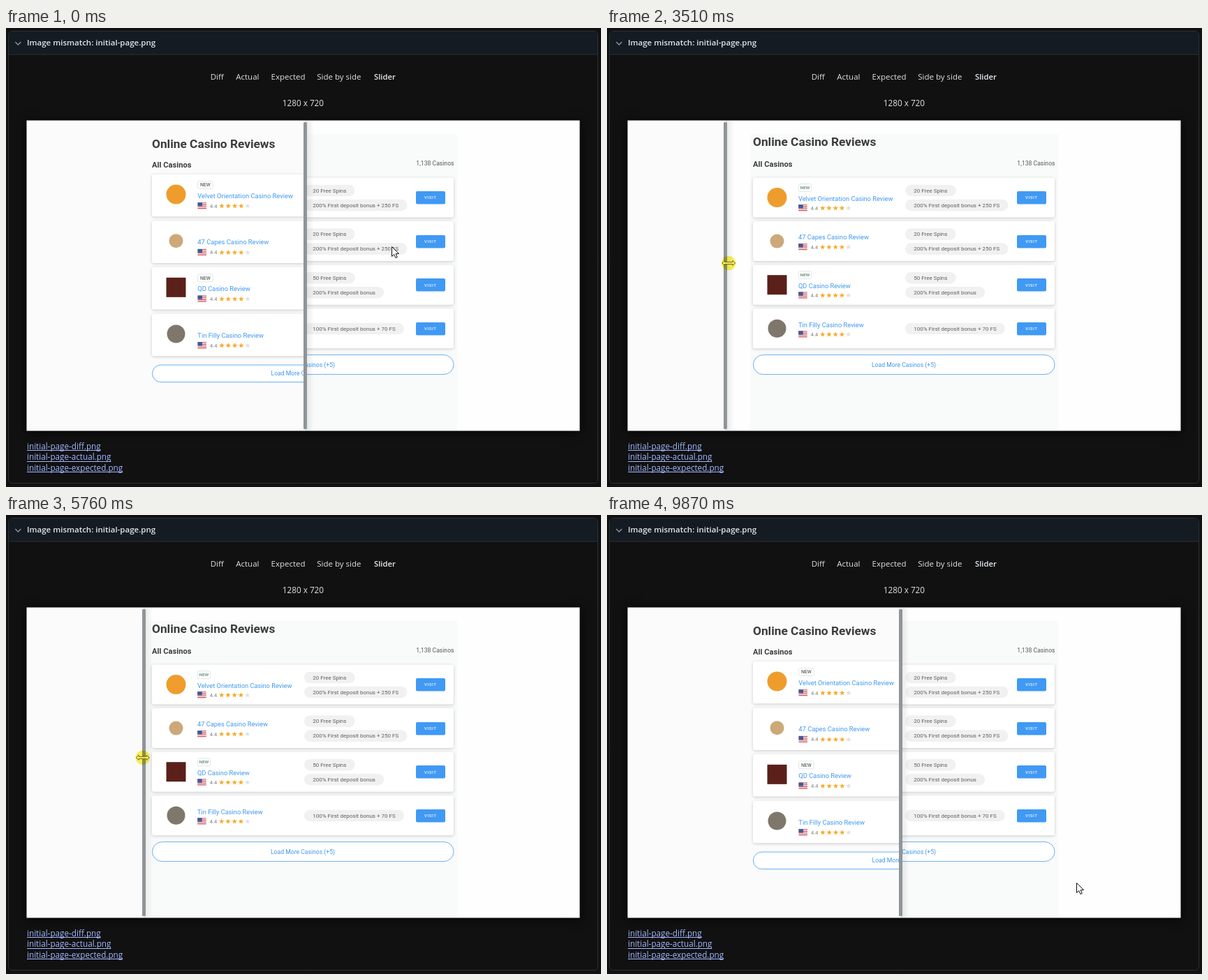
Recreate the animation shown at these times as an HTML page with a canvas. Size 852 px wide and 658 px high, loop 10000 ms.

```html
<!DOCTYPE html>
<html lang="en">
<head>
<meta charset="utf-8">
<title>Image mismatch</title>
<style>
html, body { margin: 0; width: 100%; height: 100%; overflow: hidden; background: #111; }
canvas { display: block; }
</style>
</head>
<body>
<canvas id="stage" width="852" height="658"></canvas>
<script>
const W = 852, H = 658, LOOP = 10000;
const UI = '"Open Sans", "Noto Sans", sans-serif';
const WEB = 'Roboto, Arial, sans-serif';
const VIEW = { x: 30, y: 133, w: 791, h: 444 };
const BLUE = '#4098ee';

const reviews = [
  { name: 'Velvet Orientation', isNew: true, logo: ['circle', '#ee9d2c', 14], pills: ['20 Free Spins', '200% First deposit bonus +250 FS'] },
  { name: '47 Capes', logo: ['circle', '#cda878', 10], pills: ['20 Free Spins', '200% First deposit bonus +250 FS'] },
  { name: 'QD Casino', isNew: true, logo: ['square', '#5b2019', 14], pills: ['50 Free Spins', '200% First deposit bonus'] },
  { name: 'Tin Filly Casino', logo: ['circle', '#7f776b', 13], pills: ['100% First deposit bonus +70 FS'] }
];

// Two renderings of the same page; row offsets are relative to each card's centre.
const actual = {
  titleY: 166.3, subY: 196.3, countY: 195.3, firstY: 240, step: 66.67, cardH: 60.5,
  nameX: 274.3, nameSize: 9.37, newSize: 6.8, newW: 22, newInk: '#5d6662',
  pillX: 430.5, pillSize: 7.85, pillY: [-10.5, 10], pad: 12.3, visitX: 586, visitW: 43, logoY: -1.5,
  moreY: 495.3, moreH: 24.5, moreX: 425.6,
  rows: () => [-15, 0.3, 15],
  label: s => s
};
const expected = {
  titleY: 163.3, subY: 195.2, countY: 193.5, firstY: 243, step: 62.6, cardH: 57,
  nameX: 274, nameSize: 9.27, newSize: 6.2, newW: 19, newInk: '#57866a',
  pillX: 427, pillSize: 8.03, pillY: [-10, 11], pad: 12.2, visitX: 587, visitW: 42, logoY: 0,
  moreY: 482.6, moreH: 28, moreX: 425,
  rows: isNew => isNew ? [-14, 1.3, 15] : [0, -5.5, 8.3],
  label: s => s.replace('+', '+ ')
};

// Pointer path: time, x, y of the pointer's centre.
const path = [
  [0, 557, 321], [60, 557, 321], [740, 428, 322], [940, 428, 322],
  [1330, 226, 322], [1880, 661, 323], [2030, 661, 323],
  [2340, 585, 325], [3040, 169, 335], [3180, 163, 336], [3430, 163, 336],
  [3510, 174, 337], [4320, 656, 340], [4610, 656, 340],
  [4930, 556, 341], [5620, 208, 347], [5830, 194, 348], [6050, 194, 348],
  [6660, 648, 356], [6800, 659, 356], [6940, 659, 356],
  [7450, 249, 357], [7830, 420, 358], [8170, 420, 358],
  [8440, 467, 313], [9040, 467, 313], [9550, 764, 613], [9870, 677, 535]
];
const PRESS = 740, RELEASE = 8030, LAG = 25;

function secant(i, c) {
  return (path[i + 1][c] - path[i][c]) / (path[i + 1][0] - path[i][0]);
}
function slope(i, c) {
  if (i === 0 || i === path.length - 1) return 0;
  const a = secant(i - 1, c), b = secant(i, c);
  return a * b <= 0 ? 0 : 2 * a * b / (a + b);
}
// Monotone cubic interpolation along one column of the path.
function along(t, c) {
  const last = path.length - 1;
  if (t >= path[last][0]) return path[last][c];
  let i = 0;
  while (path[i + 1][0] <= t) i++;
  const d = path[i + 1][0] - path[i][0], u = (t - path[i][0]) / d, v = 1 - u;
  return path[i][c] * (1 + 2 * u) * v * v + slope(i, c) * d * u * v * v
    + path[i + 1][c] * u * u * (3 - 2 * u) - slope(i + 1, c) * d * u * u * v;
}

function layer(draw) {
  const canvas = document.createElement('canvas');
  canvas.width = W;
  canvas.height = H;
  draw(canvas.getContext('2d'));
  return canvas;
}
// Text whose capitals are centred on y.
function text(g, str, x, y, size, color, { font = WEB, weight = 400, align = 'left', spacing = 0 } = {}) {
  g.font = `${weight} ${size}px ${font}`;
  g.letterSpacing = spacing + 'px';
  g.textAlign = align;
  g.fillStyle = color;
  g.fillText(str, x, y + size * 0.355);
  const width = g.measureText(str).width;
  g.letterSpacing = '0px';
  return width;
}
function box(g, x, y, w, h, r, fill, stroke) {
  g.beginPath();
  g.roundRect(x, y, w, h, r);
  if (fill) { g.fillStyle = fill; g.fill(); }
  if (stroke) { g.strokeStyle = stroke; g.lineWidth = 1; g.stroke(); }
}
function polygon(g, points) {
  g.beginPath();
  points.forEach(([x, y]) => g.lineTo(x, y));
  g.closePath();
}
function star(g, x, y, color) {
  polygon(g, Array.from({ length: 10 }, (_, i) => {
    const r = i % 2 ? 1.7 : 3.9, a = i * Math.PI / 5;
    return [x + r * Math.sin(a), y - r * Math.cos(a)];
  }));
  g.fillStyle = color;
  g.fill();
}
function flag(g, x, y) {
  for (let i = 0; i < 7; i++) {
    g.fillStyle = i % 2 ? '#f3dfe0' : '#cf5560';
    g.fillRect(x, y + i * 1.3, 12.5, 1.3);
  }
  g.fillStyle = '#405a96';
  g.fillRect(x, y, 6.5, 5.2);
}
function logo(g, [shape, color, r], x, y) {
  g.fillStyle = color;
  g.beginPath();
  if (shape === 'circle') g.arc(x, y, r, 0, 7);
  else g.rect(x - r, y - r, 2 * r, 2 * r);
  g.fill();
}

function card(g, page, review, y) {
  g.save();
  g.shadowColor = 'rgba(0,0,0,.2)';
  g.shadowBlur = 4;
  g.shadowOffsetY = 1;
  box(g, 209, y - page.cardH / 2, 432, page.cardH, 3, '#fff');
  g.restore();
  logo(g, review.logo, 243.5, y + page.logoY);

  const [newY, nameY, rateY] = page.rows(review.isNew), x = page.nameX;
  if (review.isNew) {
    box(g, x + 0.2, y + newY - 5.5, page.newW - 0.5, 11, 2, '#fff', '#e4e6e6');
    text(g, 'NEW', x + page.newW / 2, y + newY, page.newSize, page.newInk, { weight: 500, align: 'center' });
  }
  text(g, review.name + (review.name.endsWith('Casino') ? '' : ' Casino') + ' Review', x, y + nameY, page.nameSize, BLUE);
  flag(g, x + 0.2, y + rateY - 4.8);
  text(g, '4.4', x + 17.8, y + rateY, 7.4, '#7b7b7b');
  for (let i = 0; i < 5; i++) star(g, x + 34.7 + i * 9.25, y + rateY + 0.2, i < 4 ? '#f9ab2b' : '#dfe2e5');

  review.pills.forEach((pill, i) => {
    const py = y + (review.pills.length > 1 ? page.pillY[i] : 0.2), str = page.label(pill);
    g.font = `400 ${page.pillSize}px ${WEB}`;
    const w = g.measureText(str).width;
    box(g, page.pillX, py - 8.3, w + 2 * page.pad, 16.6, 8.3, '#f1f1f1');
    text(g, str, page.pillX + page.pad, py, page.pillSize, '#5c5f61');
  });
  box(g, page.visitX, Math.round(y - 9), page.visitW, 18.5, 2, '#4099f3');
  text(g, 'VISIT', 607.8, y + 0.2, 6.2, '#e9f4ff', { weight: 500, align: 'center', spacing: 0.5 });
}

function drawPage(g, page) {
  if (page === actual) {
    g.fillStyle = '#fbfbfb';
    g.fillRect(VIEW.x, VIEW.y, VIEW.w, VIEW.h);
  } else {
    g.fillStyle = '#fefefe';
    g.fillRect(VIEW.x, VIEW.y, VIEW.w, VIEW.h);
    g.fillStyle = '#f9fafa';
    g.fillRect(205, 152, 441, 425);
  }
  text(g, 'Online Casino Reviews', 209, page.titleY, 17.3, '#3c3c3c', { weight: 700 });
  text(g, 'All Casinos', 209, page.subY, 11.15, '#3c3c3c', { weight: 700 });
  text(g, '1,138 Casinos', 641.5, page.countY, 8.65, '#55585a', { align: 'right' });
  reviews.forEach((review, i) => card(g, page, review, page.firstY + i * page.step));
  box(g, 209.5, page.moreY - page.moreH / 2, 431.5, page.moreH, page.moreH / 2, '#fff', '#6cb0ee');
  text(g, 'Load More Casinos (+5)', page.moreX, page.moreY, 8.65, BLUE, { align: 'center' });
}

function drawChrome(g) {
  g.fillStyle = '#111';
  g.fillRect(0, 0, W, H);
  box(g, 3.5, 4.5, 844, 648, 5, '#111', '#2b3037');
  box(g, 4, 5, 843, 33, [5, 5, 0, 0], '#151b22');
  g.fillStyle = '#2b3037';
  g.fillRect(4, 37.5, 843, 1);
  g.beginPath();
  g.moveTo(13.3, 20);
  g.lineTo(17.3, 24);
  g.lineTo(21.3, 20);
  g.strokeStyle = '#8b949e';
  g.lineWidth = 1.4;
  g.stroke();

  text(g, 'Image mismatch: initial-page.png', 30, 21, 11.5, '#e3e8ed', { font: UI, weight: 600 });
  const tabs = [['Diff', 292.7], ['Actual', 329.3], ['Expected', 379.6], ['Side by side', 445.3]];
  for (const [label, x] of tabs) text(g, label, x, 69.7, 11.5, '#dbe0e5', { font: UI });
  text(g, 'Slider', 527, 69.7, 11.3, '#e6ebf0', { font: UI, weight: 600 });
  text(g, '1280 x 720', 425.4, 107.7, 11.75, '#dde1e6', { font: UI, align: 'center' });

  ['diff', 'actual', 'expected'].forEach((kind, i) => {
    const y = 599.7 + i * 15.6;
    const w = text(g, `initial-page-${kind}.png`, 30, y, 11.7, '#a3b8ff', { font: UI });
    g.fillRect(30, Math.round(y + 5.2), w, 1);
  });

  // The frame reaches half a pixel past the picture on every side.
  g.save();
  g.shadowColor = 'rgba(0,0,0,.8)';
  g.shadowBlur = 14;
  g.shadowOffsetY = 2;
  g.fillStyle = '#fff';
  g.fillRect(VIEW.x - 0.5, VIEW.y - 0.5, VIEW.w + 1, VIEW.h + 1);
  g.restore();
}

function drawHandle(g, x) {
  const shade = g.createLinearGradient(x, 0, x + 13, 0);
  shade.addColorStop(0, 'rgba(0,0,0,.1)');
  shade.addColorStop(1, 'rgba(0,0,0,0)');
  g.fillStyle = shade;
  g.fillRect(x, VIEW.y, 13, VIEW.h);
  box(g, x - 2, 135, 5, 440, 1.5, '#8f9599');
}
function outline(g, points, color) {
  polygon(g, points);
  g.fillStyle = '#fff';
  g.fill();
  g.strokeStyle = color;
  g.lineWidth = 1;
  g.stroke();
}
function drawArrow(g, x, y) {
  const shape = [[0, 0], [0, 14], [3.2, 11], [5.5, 16], [7.8, 15], [5.7, 10.2], [10, 10]];
  outline(g, shape.map(([dx, dy]) => [x - 4.5 + dx, y - 7.5 + dy]), '#111');
}
function drawResize(g, x, y, pressed) {
  const top = [[-9.5, 0], [-5.5, -3.5], [-5.5, -1.5], [5.5, -1.5], [5.5, -3.5], [9.5, 0]];
  const bottom = top.slice(1, 5).reverse().map(([dx, dy]) => [dx, -dy]);
  outline(g, [...top, ...bottom].map(([dx, dy]) => [x + dx, y + dy]), pressed ? '#6b6b62' : '#111');
  if (!pressed) return;
  g.save();
  g.globalCompositeOperation = 'multiply';
  g.fillStyle = '#fbf25c';
  g.beginPath();
  g.arc(x, y, 10.3, 0, 7);
  g.fill();
  g.restore();
}

const stage = document.getElementById('stage').getContext('2d');
const chrome = layer(drawChrome);
const left = layer(g => drawPage(g, actual));
const right = layer(g => drawPage(g, expected));

function render(t) {
  const x = along(t, 1), y = along(t, 2);
  const split = Math.round(along(Math.min(Math.max(t - LAG, PRESS), RELEASE), 1));
  const pressed = t >= PRESS && t < RELEASE;

  stage.drawImage(chrome, 0, 0);
  stage.save();
  stage.beginPath();
  stage.rect(VIEW.x, VIEW.y, VIEW.w, VIEW.h);
  stage.clip();
  stage.drawImage(right, 0, 0);
  stage.beginPath();
  stage.rect(VIEW.x, VIEW.y, split - VIEW.x, VIEW.h);
  stage.save();
  stage.clip();
  stage.drawImage(left, 0, 0);
  stage.restore();
  drawHandle(stage, split);
  stage.restore();

  if (pressed || Math.abs(x - split) < 5) drawResize(stage, x, y, pressed);
  else drawArrow(stage, x, y);
}

const start = performance.now();
function frame() {
  render((performance.now() - start) % LOOP);
  requestAnimationFrame(frame);
}
frame();
</script>
</body>
</html>
```
